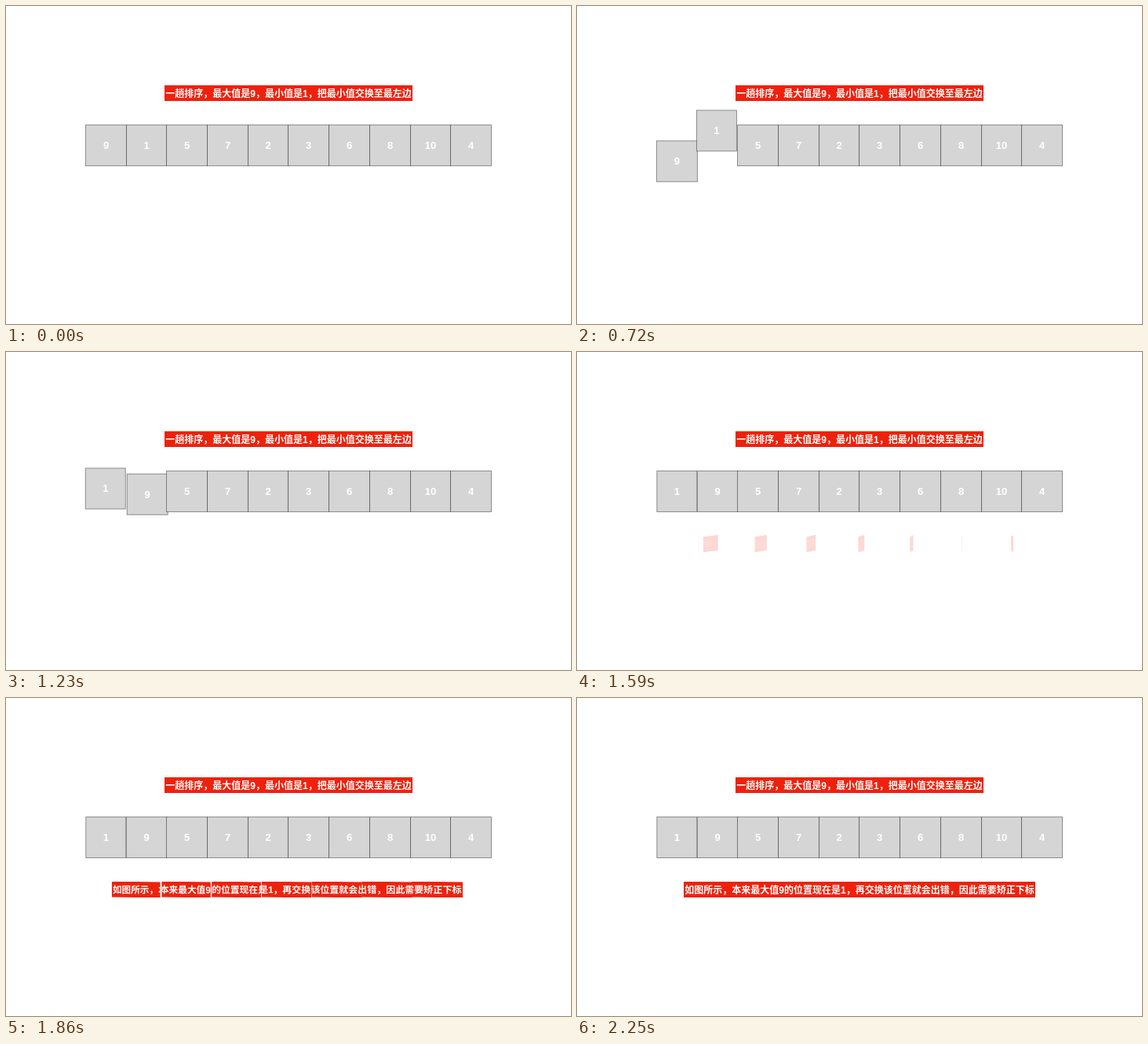
An HTML page with a canvas for the animation above (2.73 s loop, 720x405 px).

```html
<!DOCTYPE html>
<html lang="zh-CN">
<head>
<meta charset="utf-8">
<title>选择排序</title>
<style>
html, body { margin: 0; width: 100%; height: 100%; overflow: hidden; background: #fff; }
canvas { display: block; }
</style>
</head>
<body>
<canvas id="stage" width="720" height="405" lang="zh-CN"></canvas>
<script>
const ctx = document.getElementById('stage').getContext('2d');
const LOOP = 2730, STEP = 30;
const SWAP = { start: 450, length: 900 };
const REVEAL = { start: 1530, length: 720 };
const FONT = '"Liberation Sans", Arial, "Noto Sans CJK SC", "Noto Sans CJK", sans-serif';
const RED = '#ee220c';

const values = [9, 1, 5, 7, 2, 3, 6, 8, 10, 4];
const TOP = 151.5, SIZE = 52, PITCH = 51.7;

// Control points relative to the resting place of each moving cell
const paths = [
  [[0, 0], [-13.5, 51], [PITCH + 16, 51], [PITCH, 0]],
  [[0, 0], [9, -46.7], [-PITCH - 9, -46.7], [-PITCH, 0]]
];

const captions = {
  top: { text: '一趟排序，最大值是9，最小值是1，把最小值交换至最左边', x: 202, y: 101, w: 316, h: 20 },
  bottom: { text: '如图所示，本来最大值9的位置现在是1，再交换该位置就会出错，因此需要矫正下标', x: 136, y: 234, w: 448, h: 20 }
};

const clamp = v => Math.min(1, Math.max(0, v));
const progress = (span, time) => clamp((time - span.start) / span.length);
const edge = i => Math.floor(101.45 + PITCH * i) + 0.5;

function cubic(a, b, c, d, u) {
  const v = 1 - u;
  return v * v * v * a + 3 * v * v * u * b + 3 * v * u * u * c + u * u * u * d;
}

function easeInOut(t) {
  let lo = 0, hi = 1;
  for (let i = 0; i < 24; i++) {
    const mid = (lo + hi) / 2;
    if (cubic(0, 0.42, 0.58, 1, mid) < t) lo = mid; else hi = mid;
  }
  return cubic(0, 0, 1, 1, lo);
}

function pointOn(path, u) {
  return [0, 1].map(k => cubic(path[0][k], path[1][k], path[2][k], path[3][k], u));
}

// Point at a given share of the arc length
function pointAlong(path, share) {
  const n = 200, points = [[0, 0]], lengths = [0];
  for (let i = 1; i <= n; i++) {
    const p = pointOn(path, i / n), q = points[i - 1];
    points.push(p);
    lengths.push(lengths[i - 1] + Math.hypot(p[0] - q[0], p[1] - q[1]));
  }
  const goal = share * lengths[n];
  let i = 1;
  while (i < n && lengths[i] < goal) i++;
  const f = (goal - lengths[i - 1]) / (lengths[i] - lengths[i - 1]);
  return [0, 1].map(k => points[i - 1][k] + f * (points[i][k] - points[i - 1][k]));
}

function drawCell(i, share) {
  const [dx, dy] = paths[i] ? pointAlong(paths[i], share) : [0, 0];
  const x = edge(i) + dx, y = TOP + dy, w = edge(i + 1) - edge(i);
  ctx.fillStyle = '#d5d5d5';
  ctx.fillRect(x, y, w, SIZE);
  ctx.strokeStyle = 'rgba(0, 0, 0, 0.4)';
  ctx.lineWidth = 1;
  ctx.strokeRect(x, y, w, SIZE);
  ctx.fillStyle = '#fff';
  ctx.font = 'bold 13px ' + FONT;
  ctx.fillText(values[i], x + w / 2, y + SIZE / 2 + 4.5);
}

function drawCaption({ text, x, y, w, h }) {
  ctx.fillStyle = RED;
  ctx.fillRect(x, y, w, h);
  ctx.fillStyle = '#fff';
  ctx.font = 'bold 12px ' + FONT;
  ctx.fillText(text, x + w / 2, y + h / 2 + 4.5);
}

// Strips swing around vertical axes, seen from the stage centre
function drawSwing(box, t) {
  const count = 7, half = box.w / count / 2, depth = 1100;
  const camX = 360, camY = 202.5, midY = box.y + box.h / 2;
  const angle = 95 * Math.PI / 180 * (1 - t) * Math.cos(1.2 * Math.PI * t);
  const sin = Math.sin(angle), cos = Math.cos(angle);
  const shift = 16.6 * sin - 16 * (1 - cos);

  for (let i = 0; i < count; i++) {
    const left = box.x + 2 * half * i, centre = left + half;
    const [a, b] = [-half, half].map(d => {
      const scale = depth / (depth + d * sin);
      return {
        x: camX + (centre + shift - camX + d * cos) * scale,
        y: camY + (midY - camY) * scale
      };
    });
    ctx.save();
    ctx.globalAlpha = clamp(t / 0.46);
    ctx.transform((b.x - a.x) / (2 * half), (b.y - a.y) / (2 * half), 0, 1, a.x, a.y);
    ctx.translate(-left, -midY);
    ctx.beginPath();
    ctx.rect(left, box.y, 2 * half, box.h);
    ctx.clip();
    drawCaption(box);
    ctx.restore();
  }
}

function draw(time) {
  ctx.fillStyle = '#fff';
  ctx.fillRect(0, 0, 720, 405);
  ctx.textAlign = 'center';
  ctx.textBaseline = 'alphabetic';
  drawCaption(captions.top);
  const share = easeInOut(progress(SWAP, time));
  values.forEach((_, i) => drawCell(i, share));
  const t = progress(REVEAL, time);
  if (t === 1) drawCaption(captions.bottom);
  else if (t > 0) drawSwing(captions.bottom, t);
}

const begin = performance.now();
function tick() {
  const time = (performance.now() - begin) % LOOP;
  draw(Math.floor(time / STEP) * STEP);
  requestAnimationFrame(tick);
}
tick();
</script>
</body>
</html>
```
